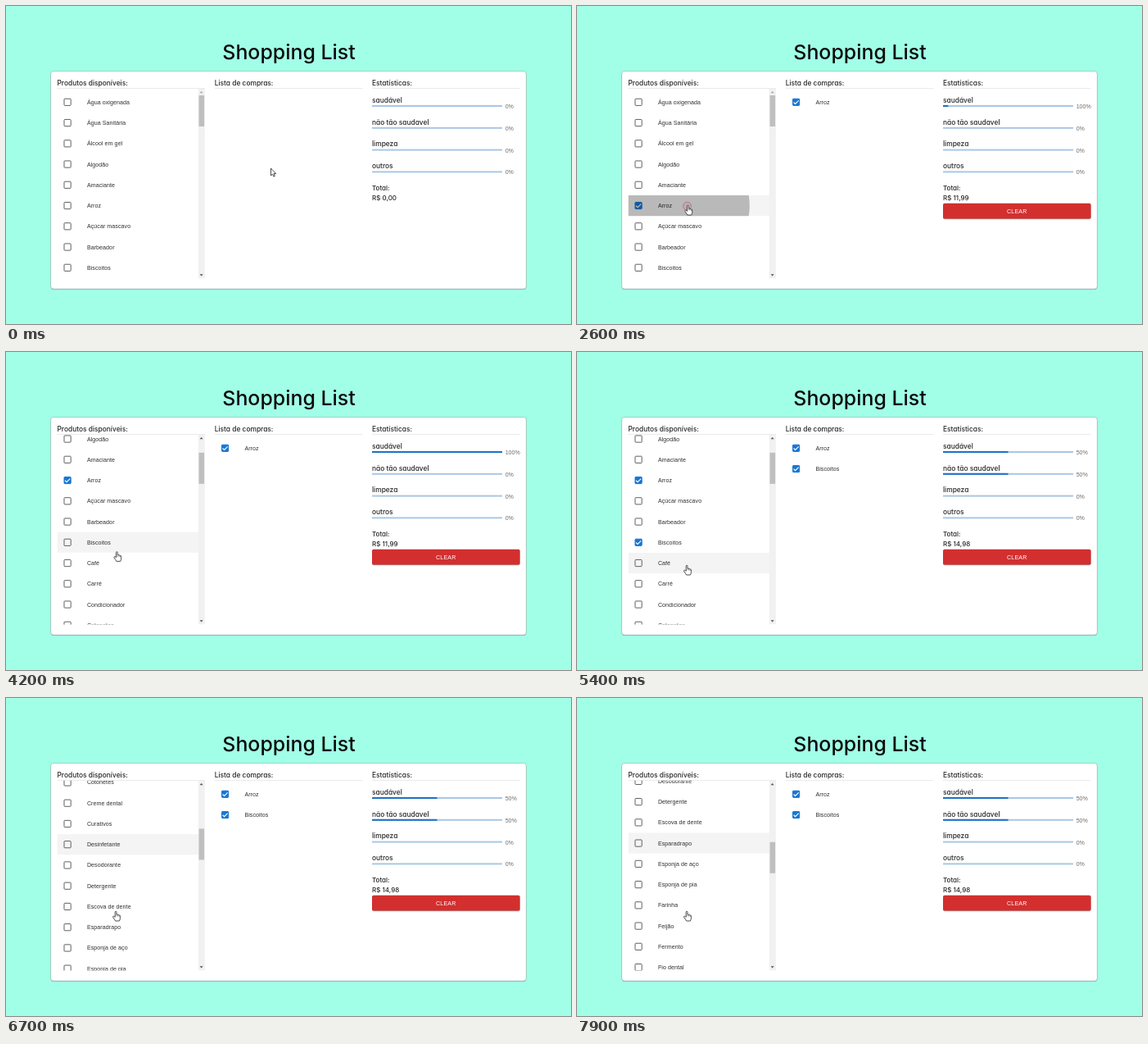
These frames come from a looping animation (690x388 px, 8 s). An HTML page:

```html
<!DOCTYPE html>
<html lang="pt">
<head>
<meta charset="utf-8">
<title>Shopping List</title>
<style>
  html, body { margin: 0; width: 100%; height: 100%; overflow: hidden; background: #a1ffe7; }
  svg { display: block; width: 100vw; height: 100vh; }
  text { font: 7.07px "Liberation Sans", Arial, sans-serif; letter-spacing: .076px; fill: #2f2f2f; }
  .head { font: 500 8.4px Inter, sans-serif; letter-spacing: 0; font-feature-settings: "cv11"; fill: #262626; }
  .sum { font-size: 8px; }
  .title { font: 500 24.9px Inter, sans-serif; letter-spacing: 0; fill: #0a0a0a; text-anchor: middle; }
  .pct { fill: #6b6b6b; letter-spacing: 0; }
  .btn { fill: #fff; font-weight: 500; letter-spacing: .2px; text-anchor: middle; }
</style>
</head>
<body>
<svg id="stage" viewBox="0 0 690 388">
  <defs>
    <clipPath id="listClip"><rect x="62.5" y="100.8" width="180.5" height="231.8"/></clipPath>
    <clipPath id="rowClip"><rect x="62.5" y="-12.6" width="172.5" height="25.2"/></clipPath>
    <filter id="soft" x="-5%" y="-20%" width="110%" height="150%"><feGaussianBlur stdDeviation=".6"/></filter>
  </defs>
</svg>
<script>
const NS = 'http://www.w3.org/2000/svg';
const stage = document.getElementById('stage');
const LOOP = 8000, STEP = 100, ROW = 25.25, TOP = 117.3;
const BUY = [2584, 4780];
const items = ['Água oxigenada', 'Água Sanitária', 'Álcool em gel', 'Algodão', 'Amaciante', 'Arroz',
  'Açúcar mascavo', 'Barbeador', 'Biscoitos', 'Café', 'Carré', 'Condicionador', 'Cotonetes',
  'Creme dental', 'Curativos', 'Desinfetante', 'Desodorante', 'Detergente', 'Escova de dente',
  'Esparadrapo', 'Esponja de aço', 'Esponja de pia', 'Farinha', 'Feijão', 'Fermento', 'Fio dental'];
const picks = [5, 8];

// [start, duration, distance]
const scrolls = [[3150, 540, 87], [5650, 540, 87], [6330, 505, 174], [7600, 408, 87]];
// [time, row under the pointer]
const hovers = [[550, 2], [1000, 3], [1200, 4], [1670, 5], [3380, 7], [3550, 8], [5130, 9],
  [5850, 11], [6100, 13], [6520, 15], [6720, 18], [6950, 19]];
// [time, x, y]
const path = [[0, 323.5, 198], [900, 155, 178], [1400, 135.5, 228], [1600, 135.5, 229], [1700, 135.7, 236],
  [2000, 135.5, 243], [5100, 135.5, 243.5], [5300, 134.2, 260]];

function el(tag, attrs = {}, parent = stage, str) {
  const node = document.createElementNS(NS, tag);
  set(node, attrs);
  if (str !== undefined) node.textContent = str;
  return parent.appendChild(node);
}
function set(node, attrs) {
  for (const k in attrs) node.setAttribute(k, attrs[k]);
}
const rect = (x, y, width, height, fill, parent, more) => el('rect', { x, y, width, height, fill, ...more }, parent);
const label = (x, y, str, cls, parent) => el('text', { x, y, class: cls || '' }, parent, str);
const show = (node, on) => { node.style.display = on ? '' : 'none'; };
const clamp = v => Math.max(0, Math.min(1, v));
const smooth = v => { v = clamp(v); return v * v * (3 - 2 * v); };

function checkbox(x, y, parent) {
  const g = el('g', { transform: `translate(${x} ${y})` }, parent);
  const box = rect(-4.1, -4.1, 8.2, 8.2, 'none', g, { rx: .8, 'stroke-width': 1 });
  const tick = el('path', { d: 'M-3.1 .2L-1 2.2L3.1 -1.9', fill: 'none', stroke: '#fff', 'stroke-width': 1.1 }, g);
  return on => {
    set(box, { fill: on ? '#1976d2' : 'none', stroke: on ? '#1976d2' : '#606060' });
    show(tick, on);
  };
}

// card
rect(54.6, 79.9, 580.8, 266, '#000', stage, { rx: 3.5, opacity: .3, filter: 'url(#soft)' });
rect(54.6, 79.5, 580.8, 265.8, '#fff', stage, { rx: 3.5, stroke: '#86b3a8', 'stroke-width': .6 });
label(345.5, 65, 'Shopping List', 'title');
[[62.5, 'Produtos disponíveis:'], [254.7, 'Lista de compras:'], [447, 'Estatísticas:']].forEach(([x, str]) => {
  label(x, 96.6, str, 'head');
  rect(x, 100, 180.7, .7, '#e2e2e2');
});

// product list
const list = el('g', { 'clip-path': 'url(#listClip)' });
const roll = el('g', {}, list);
const rows = items.map((name, i) => {
  const g = el('g', { transform: `translate(0 ${TOP + i * ROW})` }, roll);
  const bg = rect(62.5, -12.6, 172.5, 25.2, '#000', g);
  const check = checkbox(75.1, 0, g);
  label(98.9, 2.5, name, '', g);
  return { g, bg, check };
});
const waves = picks.map(i => {
  const g = el('g', { 'clip-path': 'url(#rowClip)' }, rows[i].g);
  return el('circle', { cx: 135.2, cy: 0 }, g);
});
rect(234.8, 100.8, 8, 231.8, '#f1f1f1', list);
const thumb = rect(235.5, 109, 6.6, 38, '#bfbfbf', list);
const up = el('path', { d: 'M236.6 106.2h4l-2 -2.2z' }, list);
el('path', { d: 'M236.6 327.2h4l-2 2.2z', fill: '#505050' }, list);

// chosen items
const chosen = picks.map((i, n) => {
  const g = el('g', { transform: `translate(0 ${TOP + n * ROW})` });
  checkbox(267.6, 0, g)(true);
  label(291.4, 2.5, items[i], '', g);
  return g;
});

// statistics
const bars = ['saudável', 'não tão saudavel', 'limpeza', 'outros'].map((name, i) => {
  const y = i * 26.8;
  label(447, 117.8 + y, name, 'head');
  rect(447, 121 + y, 159, 2, '#a7c8e6');
  return {
    fill: rect(447, 121 + y, 0, 2, '#1b72c6'),
    pct: label(609.7, 124.9 + y, '0%', 'pct')
  };
});
label(447, 224.8, 'Total:', 'head sum');
const total = label(447, 237.2, '', 'head sum');
const clear = el('g');
rect(447, 241.4, 180.6, 18.8, '#000', clear, { rx: 2, opacity: .35, filter: 'url(#soft)' });
rect(447, 240.8, 180.6, 18.6, '#d32f2f', clear, { rx: 2 });
label(537.3, 252.6, 'CLEAR', 'btn', clear);

// pointer
const ring = el('circle', { fill: 'rgba(200,90,140,.15)', stroke: '#b5607f', 'stroke-width': .7 });
const ink = { fill: '#fff', stroke: '#222', 'stroke-width': .8, 'stroke-linejoin': 'round' };
const arrow = el('path', { d: 'M0 0V9L2 7.1L3.4 10.2L4.9 9.5L3.5 6.5H6.2Z', ...ink });
const hand = el('g');
el('path', {
  d: 'M-1 7.4V1.2Q-1 .3 -.1 .3Q.8 .3 .8 1.2V4.2Q1.9 3.6 2.5 4.6Q3.6 4.1 4 5.1Q5.2 4.8 5.2 6V8.6' +
     'Q5.2 10.2 4.2 12H-.6Q-1.4 10.4 -3.5 7.6Q-4 6.5 -3 6.2Q-2 6.2 -1 7.4Z', ...ink
}, hand);
el('path', { d: 'M.8 4.4V6.4M2.5 4.8V6.5M4 5.4V6.8', stroke: '#222', 'stroke-width': .5 }, hand);

function pointerAt(t) {
  let n = 0;
  while (n < path.length - 1 && path[n + 1][0] <= t) n++;
  const [t0, x0, y0] = path[n], [t1, x1, y1] = path[n + 1] || [t0 + 1, x0, y0];
  const p = smooth((t - t0) / (t1 - t0));
  return [x0 + (x1 - x0) * p, y0 + (y1 - y0) * p];
}

function hoverOf(row, t) {
  let level = 0;
  hovers.forEach(([at, r], n) => {
    if (r !== row) return;
    const end = hovers[n + 1] ? hovers[n + 1][0] : Infinity;
    level = Math.max(level, Math.min(clamp((t - at) / 150), 1 - clamp((t - end) / 150)));
  });
  return level;
}

function draw(t) {
  const scroll = scrolls.reduce((sum, [at, len, dist]) => sum + dist * smooth((t - at) / len), 0);
  set(roll, { transform: `translate(0 ${-scroll})` });
  set(thumb, { y: 109 + scroll * .159 });
  set(up, { fill: scroll > 0 ? '#505050' : '#a3a3a3' });

  const bought = BUY.filter(at => t >= at).length;
  rows.forEach((row, i) => {
    set(row.bg, { opacity: .042 * hoverOf(i, t) });
    row.check(picks.slice(0, bought).includes(i));
  });
  chosen.forEach((g, n) => show(g, n < bought));

  let ringSize = 0;
  BUY.forEach((at, n) => {
    const age = t - at + 300;
    set(waves[n], {
      r: 101 * smooth(age / 470),
      opacity: age < 0 ? 0 : .25 * (1 - clamp((t - at) / 550))
    });
    if (age >= 0 && age < 480) ringSize = 3 + age / 160;
  });

  const first = clamp((t - BUY[0]) / 400), second = clamp((t - BUY[1]) / 400);
  const levels = [first - second / 2, second / 2, 0, 0];
  const shares = [[0, 0], [100, 0], [50, 50]][bought];
  bars.forEach((bar, i) => {
    set(bar.fill, { width: 159 * levels[i] });
    bar.pct.textContent = (shares[i] || 0) + '%';
  });
  total.textContent = 'R$ ' + ['0,00', '11,99', '14,98'][bought];
  show(clear, bought > 0);

  const [x, y] = pointerAt(t), over = x < 235;
  set(arrow, { transform: `translate(${x} ${y})` });
  set(hand, { transform: `translate(${x} ${y})` });
  show(arrow, !over);
  show(hand, over);
  show(ring, ringSize > 0);
  set(ring, { cx: x - 1, cy: y + 1, r: ringSize });
}

function tick() {
  draw(Math.floor(performance.now() % LOOP / STEP) * STEP);
  requestAnimationFrame(tick);
}
tick();
</script>
</body>
</html>
```
